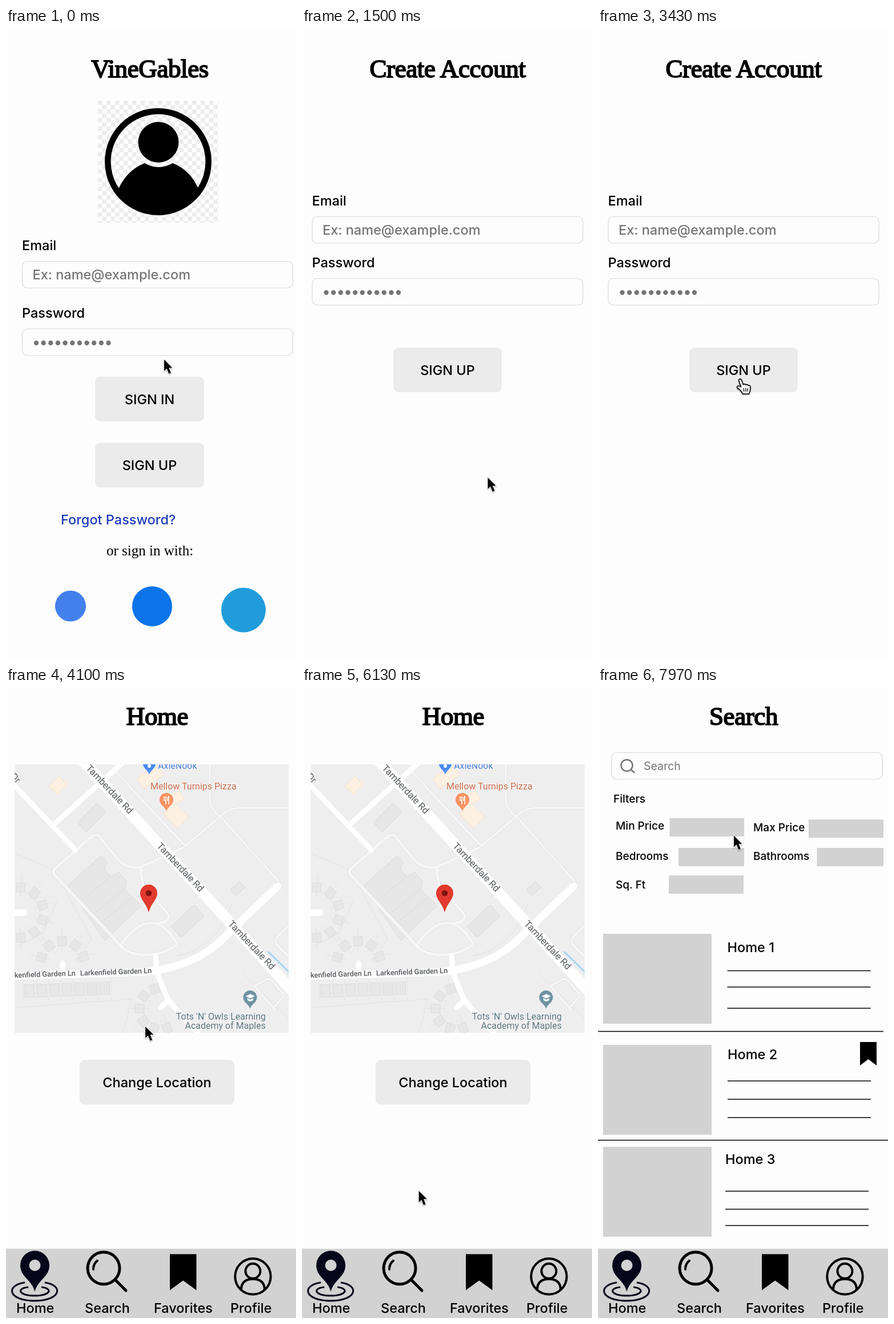
Write an HTML page that moves like this. It is 508 px wide and 1102 px high and loops after 8 s.

```html
<!DOCTYPE html>
<html lang="en">
<head>
<meta charset="utf-8">
<title>Home finder prototype</title>
<style>
  html, body { margin: 0; width: 100%; height: 100%; overflow: hidden; background: #fdfdfd; }
  svg { display: block; width: 508px; height: 1102px; }
  text { font: 500 23.5px Inter, sans-serif; white-space: pre; }
  .title { font: 45px "Liberation Serif", serif; letter-spacing: -.4px; stroke: #000; stroke-width: 1.9px; text-anchor: middle; }
  .serif { font: 25px "Liberation Serif", serif; }
  .mid { text-anchor: middle; }
  .hint { fill: #757575; }
  .small { font-size: 19px; }
  .link { fill: #1d3cb8; }
  .map text { font: 16px Roboto, sans-serif; stroke: #f6f5f5; stroke-width: 2px; paint-order: stroke; }
  .map .road { fill: #5c6064; font-size: 16.5px; text-anchor: middle; }
  .map .lane { fill: #5c6064; font-size: 12.8px; font-weight: 500; }
  .map .school { fill: #5b7480; text-anchor: end; }
  .streets { stroke-linejoin: round; stroke-linecap: round; }
</style>
</head>
<body>
<svg viewBox="0 0 508 1102"></svg>
<script>
const LOOP = 8000;
const svg = document.querySelector('svg');

const text = (x, y, s, cls = '', extra = '') => `<text x="${x}" y="${y}" class="${cls}" ${extra}>${s}</text>`;
const rect = (x, y, w, h, fill = '#d2d2d2', extra = '') =>
  `<rect x="${x}" y="${y}" width="${w}" height="${h}" fill="${fill}" ${extra}/>`;
const circle = (x, y, r, fill, extra = '') => `<circle cx="${x}" cy="${y}" r="${r}" fill="${fill}" ${extra}/>`;
const ring = (x, y, r, width, color = '#000') =>
  circle(x, y, r, 'none', `stroke="${color}" stroke-width="${width}"`);
const path = (d, fill = '#000', extra = '') => `<path d="${d}" fill="${fill}" ${extra}/>`;
const line = (d, width, color = '#000', extra = '') =>
  path(d, 'none', `stroke="${color}" stroke-width="${width}" ${extra}`);
const repeat = (n, make) => Array.from({ length: n }, (_, i) => make(i)).join('');

const field = (x, y) => rect(x + .5, y + .5, 474, 46.5, '#fdfdfd', 'rx="9" stroke="#d9d9d9" stroke-width="1.2"');
const button = (x, y, w, label) =>
  rect(x, y, w, 78, '#ebebeb', 'rx="9"') + text(x + w / 2, y + 47.5, label, 'mid');
const dots = (x, y) => repeat(11, i => circle(x + i * 12.65, y, 4.2, '#757575'));
const bookmark = (x, y, w, h, notch) => path(`M${x} ${y}h${w}v${h}l${-w / 2} ${-notch}l${-w / 2} ${notch}z`);
const teardrop = (x, y, r, tip, fill) => {
  const bend = r * .8, neck = r * .2, low = tip * .55;
  return path(`M${x - r} ${y}a${r} ${r} 0 0 1 ${2 * r} 0c0 ${bend} ${neck - r} ${low} ${-r} ${tip}` +
    `c${-neck} ${low - tip} ${-r} ${bend - tip} ${-r} ${-tip}z`, fill);
};

// Sign-in and account forms
const form = (x, emailY, passY) =>
  text(x, emailY - 19, 'Email') + field(x, emailY) +
  text(x + 18.5, emailY + 32, 'Ex: name@example.com', 'hint') +
  text(x, passY - 19, 'Password') + field(x, passY) + dots(x + 25, passY + 25);

const avatar =
  rect(161, 127, 211, 213, 'url(#checker)') + ring(266.5, 233.5, 88.2, 10.6) +
  circle(267, 199.5, 35.5, '#000') +
  path('M197 281Q212 248 243 236Q267 250 292 236Q323 248 337 281A84 84 0 0 1 197 281z');

const signIn =
  text(252, 85.5, 'VineGables', 'title') + avatar + form(28, 407, 525) +
  button(156, 609, 191, 'SIGN IN') + button(156, 724.5, 191, 'SIGN UP') +
  text(96, 867, 'Forgot Password?', 'link') + text(176, 921, 'or sign in with:', 'serif') +
  circle(113, 1009.5, 27, '#4280ec') + circle(256, 1010, 35, '#0c74ea') + circle(416, 1016.5, 39, '#219cdb');

const create =
  text(255, 86, 'Create Account', 'title') + form(17.5, 329, 437) + button(160, 558, 190, 'SIGN UP');

// Map
const lot = (x, y, w, h, turn, fill = '#e8e7e8', edge = '#dcdbdc') =>
  rect(-w / 2, -h / 2, w, h, fill, `stroke="${edge}" transform="translate(${x} ${y}) rotate(${turn})"`);
const tan = (x, y, w, h, turn) => lot(x, y, w, h, turn, '#fbf0e2', '#f2e3cf');
const roadName = (x, y) =>
  text(0, 5, 'Tamberdale Rd', 'road', `transform="translate(${x} ${y}) rotate(46.5)"`);
const fan = (cx, cy, r, from, step, n) => repeat(n, i => {
  const deg = from + i * step, a = deg * Math.PI / 180;
  const at = d => `${cx + d * Math.cos(a)} ${cy + d * Math.sin(a)}`;
  const [x, y] = at(r).split(' ').map(Number);
  return lot(x, y, 16, 15, deg) + line(`M${at(r - 16)}L${at(r + 22)}`, 1, '#e3e2e3');
});
const street = (d, width, fill = '#fff') => line(d, width + 1.6, '#e2e1e3') + line(d, width, fill);
const thin = 'M357 130V198Q358 214 378 229L478 340M310 281L385 218Q395 211 412 211H500' +
  'M185 140L315 279M435 522L456 511Q462 508 467 514L485 535Q488 540 482 545L470 558M435 522L472 565M500 412L478 434Q468 442 476 452L500 475';
const loopRoad = 'M122 284L152 260Q160 256 165 263L195 300Q211 318 235 315L310 281M152 260L86 317Q80 322 86 329L202 453Q216 468 245 468H262' +
  'M235 315L240 345L284 397Q288 405 276 411L266 414M202 449Q234 404 266 414Q282 420 299 447Q300 452 288 457Q270 467 250 467';
const streets =
  street(thin, 3.6, '#f7f6f7') + street(loopRoad, 5, '#f7f6f7') +
  line('M10 167L122 285M85 239L205 132', 9, '#fff') +
  line('M10 505L235 498Q330 492 385 435Q415 405 476 348', 13, '#fff') +
  line('M262 470L265 500L284 547L345 615M284 547L271 560M99 482V500', 9, '#fff') +
  line('M10 394H31', 12, '#fff') + line('M126 120L510 540', 19, '#fff');

const map = `<svg class="map" x="15" y="135" width="480" height="469" viewBox="15 135 480 469">` +
  rect(15, 135, 480, 469, '#efeeef') +
  line('M15 290L85 320L150 440L122 480M15 455L65 430L90 372M15 560L220 545L205 604M185 500V550M290 600L250 520M415 500L495 580M300 470Q370 455 395 380', 1, '#e2e1e2') +
  path('M108 347L167 294L177 306L172 319L184 331L198 323L211 339L208 353L222 367L237 382L173 443z', '#e8e7e8', 'stroke="#dcdbdc"') +
  line('M132 373L184 331M151 398L208 353M163 414L222 367', 1, '#dcdbdc') +
  lot(150, 228, 48, 22, -45) + lot(406, 352, 22, 14, -43) + lot(318, 409, 55, 26, -43) +
  tan(91, 172, 25, 20, -45) + tan(253, 157, 42, 22, -35) + tan(298, 224, 28, 36, -45) + tan(299, 193, 22, 18, -35) +
  fan(22, 394, 44, -85, 34, 6) + fan(99, 482, 38, -165, 37, 5) + fan(270, 562, 36, 70, 37, 6) +
  repeat(7, i => lot(41 + i * 22, 531 - i * .8, 17, 22, -2) + line(`M${30 + i * 22} 511v38`, 1, '#e2e1e2')) +
  `<g class="streets">${streets}</g>` +
  line('M459 462L498 500', 3, '#a8d4f2') +
  roadName(181, 179) + roadName(305, 315) + roadName(430, 451) +
  text(13, 163, 'Dr', 'road', 'transform="rotate(46 13 163)"') +
  text(122, 504, 'Larkenfield Garden Ln', 'lane', 'text-anchor="end" transform="rotate(-2 122 504)"') +
  text(130, 504, 'Larkenfield Garden Ln', 'lane', 'transform="rotate(-2 130 504)"') +
  text(266, 143, 'AxleNook', '', 'fill="#4a7fd8"') + teardrop(251, 134, 11, 19, '#4a8af0') + circle(251, 138, 3, '#fff') +
  text(253, 179, 'Mellow Turnips Pizza', '', 'fill="#c9714e"') + teardrop(281, 197, 12, 20, '#f79461') +
  line('M277 191v5q0 3 3 3v6M280 191v8M285 205v-14q-3 3-2 8', 1.5, '#fff') +
  text(455, 581, "Tots 'N' Owls Learning", 'school') + text(455, 597, 'Academy of Maples', 'school') +
  teardrop(427.5, 542, 12, 20, '#6e92a3') + path('M420 540l8-4 8 4-8 4zM423 543v4q5 4 10 0v-4l-5 3z', '#fff') +
  teardrop(250, 360, 15, 34, '#e23a2e') + circle(250, 360, 5.3, '#7d1410') + '</svg>';

const nav =
  rect(0, 981, 508, 121) +
  line('M33 1040C-2 1045 4 1072 50 1072C96 1072 102 1045 68 1040M39 1048C16 1051 24 1063 50 1063C77 1063 84 1051 62 1048', 3, '#05061a') +
  teardrop(50.5, 1010, 25.5, 46, '#05061a') + circle(50.5, 1010, 10, '#d2d2d2') +
  ring(171, 1015, 28, 5) +
  line('M191 1035L210 1054', 5, '#000', 'stroke-linecap="round"') + line('M153 1017Q153 1007 160 1002', 4, '#000', 'stroke-linecap="round"') +
  bookmark(287, 990.5, 46.5, 63, 17) +
  ring(432.5, 1029.5, 31.2, 4) + ring(432.5, 1020, 13, 4) +
  line('M412 1053Q412 1034 432.5 1034Q453 1034 453 1053', 4) +
  text(18, 1093, 'Home') + text(138, 1093, 'Search') + text(259, 1093, 'Favorites') + text(393, 1093, 'Profile');

const home = text(265, 66, 'Home', 'title') + map + button(129, 651, 271, 'Change Location') + nav;

// Search results
const filter = (x, y, label, boxX, boxY, w) => text(x, y, label, 'small') + rect(boxX, boxY, w, 32);
const listing = (n, y, x, nameY, rules) =>
  rect(9, y, 190, 157) + text(x, nameY, `Home ${n}`) +
  rules.map(r => line(`M${x} ${r}h251`, 1.4)).join('');

const search =
  text(255, 66, 'Search', 'title') + field(23.5, 114) +
  ring(50.5, 137, 10, 2.5, '#757575') + line('M57.5 144L64 150', 2.5, '#757575') +
  text(80, 145, 'Search', 'hint', 'style="font-weight:400;font-size:19.5px"') +
  text(27, 202, 'Filters', 'small') +
  filter(31, 249, 'Min Price', 125.5, 229, 130.5) + filter(272, 251.5, 'Max Price', 369, 231.5, 131) +
  filter(31, 301.5, 'Bedrooms', 141, 281, 115) + filter(272, 301.5, 'Bathrooms', 383.5, 281, 116.5) +
  filter(31, 351.5, 'Sq. Ft', 124, 329, 131) +
  listing(1, 431, 226.5, 463, [495.5, 524, 561]) + line('M0 601.5H500', 1.4) +
  listing(2, 625, 227, 650, [688, 720, 752]) + line('M0 791.5H508', 1.4) + bookmark(459, 620, 29, 41, 11) +
  listing(3, 803, 223, 832.5, [880.5, 912, 940.5]) + nav;

// Pages in order, each with its start time and the areas that show a hand
const pages = [
  { start: 0, body: signIn, links: [[156, 609, 347, 687], [156, 725, 347, 802]] },
  { start: 1400, body: create, links: [[160, 558, 350, 636]] },
  { start: 3970, body: home, links: [[137, 983, 216, 1100]] },
  { start: 6870, body: search, links: [] },
];

const arrow = path('M0 0V20L4.6 15.8L8.3 24.8L12 23.2L8.3 14.4H14.3z', '#000', 'stroke="#fff" stroke-width="1.6" paint-order="stroke"');
const hand =
  path('M-2.6 2Q-.5-2 2.4 1.6L5.4 9.8Q8 7.6 10 10.2Q12.6 8.6 14.4 11.4Q18 10.6 18 15Q18 21 15.5 26H4.5Q1.5 19.5-4.8 15.8Q-6.6 12.4-3 12Q-.4 12.2 1.6 14z', '#fff', 'stroke="#000" stroke-width="1.6" stroke-linejoin="round"') +
  line('M6 16l.8 6M9.6 16l.4 6M13.2 16v6', 1.3);

svg.innerHTML =
  `<defs><pattern id="checker" x="161" y="127" width="15" height="15" patternUnits="userSpaceOnUse">
    ${rect(0, 0, 15, 15, '#fff') + rect(0, 0, 7.5, 7.5, '#ececec') + rect(7.5, 7.5, 7.5, 7.5, '#ececec')}</pattern>
    <filter id="shadow" x="-50%" y="-50%" width="200%" height="200%"><feDropShadow dx="0" dy="1.2" stdDeviation="1.2" flood-opacity=".4"/></filter></defs>` +
  rect(0, 0, 508, 1102, '#fdfdfd') +
  pages.map(p => `<g class="page">${p.body}</g>`).join('') +
  `<g id="cursor" filter="url(#shadow)"><g id="arrow">${arrow}</g><g id="hand">${hand}</g></g>`;

const groups = [...svg.querySelectorAll('.page')];
const [cursor, arrowIcon, handIcon] = ['cursor', 'arrow', 'hand'].map(id => document.getElementById(id));

// Pointer stops: time, x, y
const stops = [
  [0, 277, 579], [870, 325.5, 785], [1870, 325.5, 785], [2400, 223, 550], [2480, 223, 550],
  [3000, 252, 634], [3430, 249, 613], [3530, 249, 613], [3800, 244, 593], [3970, 244, 593],
  [5400, 251, 591], [5600, 251, 591], [6450, 183, 1015], [7300, 183, 1015], [7570, 238, 270],
  [7969, 238, 270], [7970, 238, 259.5], [LOOP, 238, 259.5],
];

function pointer(t) {
  const i = stops.findIndex(s => s[0] > t);
  const [t0, x0, y0] = stops[i - 1], [t1, x1, y1] = stops[i];
  const u = (t - t0) / (t1 - t0), e = u * u * (3 - 2 * u);
  return [x0 + (x1 - x0) * e, y0 + (y1 - y0) * e];
}

const show = (el, on) => el.setAttribute('visibility', on ? 'visible' : 'hidden');

function draw(now) {
  const t = now % LOOP;
  const current = pages.findLastIndex(p => t >= p.start);
  groups.forEach((g, i) => g.style.display = i === current ? '' : 'none');
  const [x, y] = pointer(t);
  const visible = t < 6500 || t >= 6870;
  const linked = pages[current].links.some(([l, top, r, b]) => x >= l && x <= r && y >= top && y <= b);
  cursor.setAttribute('transform', `translate(${x} ${y})`);
  show(arrowIcon, visible && !linked);
  show(handIcon, visible && linked);
}

let began;
function frame(now) {
  began ??= now;
  draw(now - began);
  requestAnimationFrame(frame);
}
draw(0);
requestAnimationFrame(frame);
</script>
</body>
</html>
```
